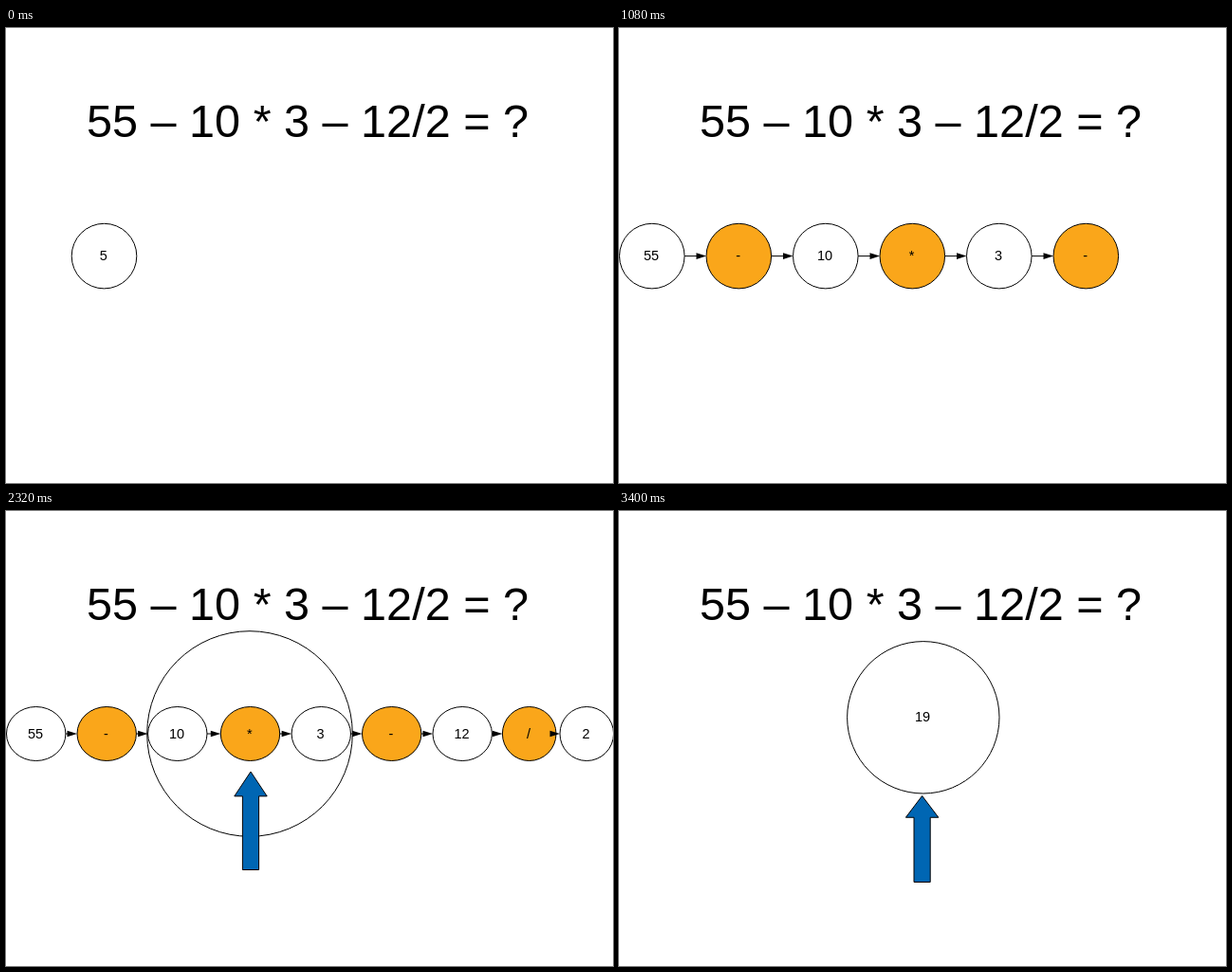
An HTML page that plays this animation: 640x480 px, repeating every 3600 ms.

```html
<!DOCTYPE html>
<html lang="en">
<head>
<meta charset="utf-8">
<title>Operator precedence</title>
<style>
  html, body { margin: 0; width: 100%; height: 100%; overflow: hidden; background: #fff; }
  svg { display: block; width: 640px; height: 480px; }
  text { font-family: "Liberation Sans", Arial, sans-serif; fill: #000; }
  .title { font-size: 48.6px; }
  .label { font-size: 14.5px; text-anchor: middle; }
  .line { stroke: #000; stroke-width: 1; }
</style>
</head>
<body>
<svg viewBox="0 0 640 480">
  <g id="steps"></g>
  <text class="title" x="85" y="115">55 – 10 * 3 – 12/2 = ?</text>
</svg>
<script>
const LOOP = 3600;
const ORANGE = '#faa61a', BLUE = '#0066b3', PURPLE = '#800080';
const TOKENS = ['55', '-', '10', '*', '3', '-', '12', '/', '2'];
const isOp = t => '-*/'.includes(t);

const ellipse = (cx, cy, rx, ry, fill) =>
  `<ellipse class="line" cx="${cx}" cy="${cy}" rx="${rx}" ry="${ry}" fill="${fill}"/>`;

const ring = (cx, cy, r) => ellipse(cx, cy, r, r, 'none');

const shape = (d, fill) => `<path class="line" d="${d}" fill="${fill}"/>`;

const node = ({ t, x, rx, ry }, cy) =>
  ellipse(x, cy, rx, ry, isOp(t) ? ORANGE : '#fff') +
  `<text class="label" x="${x - 0.7}" y="${cy + 4.5}">${t}</text>`;

const link = (x1, x2, y) =>
  `<path class="line" d="M${x1} ${y}H${x2 - 5}"/>` +
  `<path d="M${x2} ${y}l-10.5 -3.3v6.6z"/>`;

// A row of nodes joined edge to edge
function chain(nodes, cy) {
  const links = nodes.slice(1).map((n, i) =>
    link(nodes[i].x + nodes[i].rx, n.x - n.rx, cy));
  return nodes.map(n => node(n, cy)).join('') + links.join('');
}

const item = (t, x, rx, ry = rx) => ({ t, x, rx, ry });

const row = (count, start, gap) =>
  chain(TOKENS.slice(0, count).map((t, i) => item(t, start + gap * i, 34.3)), 240.6);

// Block arrow pointing up; the head takes a quarter of its height
function pointer(x, top = 275, bottom = 355.5) {
  const neck = top + (bottom - top) / 4;
  return shape(`M${x} ${top}L${x + 17.2} ${neck}H${x + 8.6}V${bottom}` +
    `H${x - 8.6}V${neck}H${x - 17.2}Z`, BLUE);
}

const hook = shape('M126.2 303.5A57.2 40 0 0 0 240.6 303.5H254.6L226.6 284L198.6 303.5' +
  'H212.2A29 20.3 0 0 1 154.2 303.5Z', PURPLE);

const CY = 235;
const FLAT = [31.7, 106.2, 180.8, 257.5, 332.3, 406.7, 481.2, 551.7, 612.3];
const flat = TOKENS.map((t, i) => item(t, FLAT[i], i < 7 ? 31.2 : 28.3, 28.5));
const full = chain(flat, CY);
const tail = flat.slice(5);
const thirty = chain([flat[0], item('-', 129.6, 31.2, 28.5), item('30', 244.2, 51.6), ...tail], CY);
const diff = item('25', 155, 51.6);
const twentyFive = chain([diff, ...tail], CY);
const last = chain([diff, flat[5], item('6', 567, 51.6)], CY);

const MINUS = 109, TIMES = 258, MINUS2 = 406.6, DIVIDE = 555.3, LONG = 378.5;

const first = item('55', 103.5, 34.3);
const pair = [first, item('-', 206.5, 34.3)];

const STEPS = [
  [0, node(item('5', 103.5, 34.3), 240.6)],
  [160, node(first, 240.6)],
  [360, chain(pair, 240.6)],
  [520, chain([...pair, item('10', 320.8, 34.3)], 240.6)],
  [720, row(4, 103.5, 91.5)],
  [880, row(5, 103.5, 91.5)],
  [1080, row(6, 34.8, 91.5)],
  [1240, row(7, 34.8, 83.9)],
  [1440, full],
  [1600, full + pointer(MINUS)],
  [1800, full + pointer(MINUS) + pointer(TIMES)],
  [1960, full + hook],
  [2160, full + pointer(TIMES) + pointer(MINUS2)],
  [2320, full + ring(257, CY, 108.3) + pointer(TIMES, 275, LONG)],
  [2520, thirty + pointer(132) + pointer(MINUS2)],
  [2680, thirty + ring(149.2, 240.7, 148.6) + pointer(132, 275, 412)],
  [2880, twentyFive + pointer(MINUS2) + pointer(DIVIDE)],
  [3040, twentyFive + ring(543, CY, 97.3) + pointer(DIVIDE, 275, LONG)],
  [3240, last + pointer(MINUS2, 275, LONG)],
  [3400, node(item('19', 320.8, 80.2), 217.8) + pointer(319.6, 300.5, 391.5)]
];

const stage = document.getElementById('steps');
let shown = -1;

function draw(now) {
  const t = now % LOOP;
  const i = STEPS.findLastIndex(([start]) => start <= t);
  if (i !== shown) {
    stage.innerHTML = STEPS[i][1];
    shown = i;
  }
}

let origin = null;
function tick(now) {
  origin ??= now;
  draw(Math.max(0, now - origin));
  requestAnimationFrame(tick);
}
draw(0);
requestAnimationFrame(tick);
</script>
</body>
</html>
```
